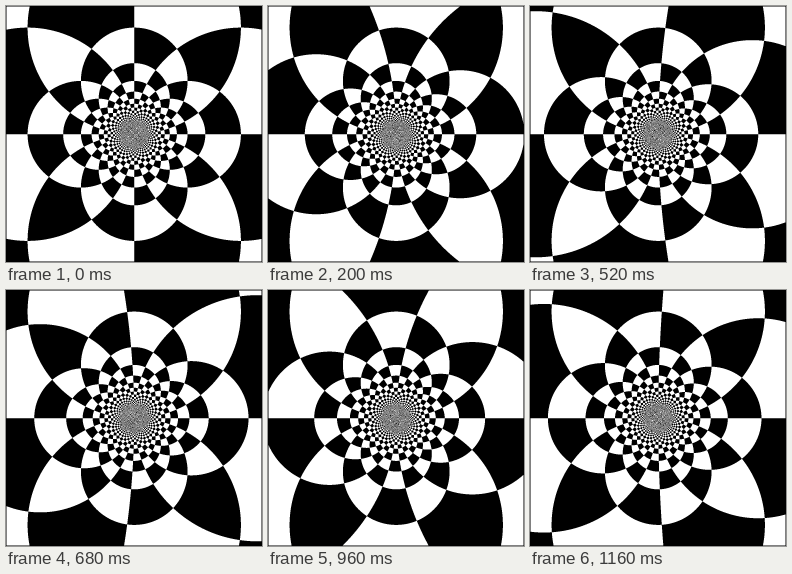
These frames come from a looping animation (256 px wide and 256 px high, 1.2 s). An HTML page with a canvas:

```html
<!DOCTYPE html>
<html lang="en">
<head>
<meta charset="utf-8">
<title>Inverted checkerboard</title>
<style>
  html, body { margin: 0; width: 100%; height: 100%; overflow: hidden; background: #000; }
  canvas { display: block; width: 100vw; height: 100vh; image-rendering: pixelated; }
</style>
</head>
<body>
<canvas id="stage" width="256" height="256"></canvas>
<script>
const SIZE = 256;
const LOOP = 1200;
const STEP = 40;
const STEPS = LOOP / STEP;
const SCALE = SIZE / 1.2; // inversion radius squared, in pixels per tile
const CENTER = SIZE / 2 + 0.25;
const SAMPLES = 4; // per pixel and axis
const BORDER = 0.5;

const ctx = document.getElementById('stage').getContext('2d');
const frames = [];

const inside = p => p > BORDER && p < SIZE - BORDER;

// A checkerboard seen through the inversion 1/z, sliding two tiles per loop.
function render(shift) {
  const fine = SIZE * SAMPLES;
  const light = new Uint8Array(SIZE * SIZE);
  for (let j = 0; j < fine; j++) {
    const py = (j + 0.5) / SAMPLES;
    if (!inside(py)) continue;
    const y = CENTER - py;
    const row = Math.floor(py) * SIZE;
    for (let i = 0; i < fine; i++) {
      const px = (i + 0.5) / SAMPLES;
      if (!inside(px)) continue;
      const x = px - CENTER;
      const k = SCALE / (x * x + y * y);
      const tile = Math.floor(x * k + shift) + Math.floor(y * k);
      light[row + Math.floor(px)] += tile & 1;
    }
  }

  const image = ctx.createImageData(SIZE, SIZE);
  const white = SAMPLES * SAMPLES;
  light.forEach((sum, n) => {
    const gray = 255 * sum / white;
    image.data.set([gray, gray, gray, 255], n * 4);
  });
  return image;
}

for (let n = 0; n < STEPS; n++) frames.push(render(2 * n / STEPS));

const start = performance.now();

function tick(now) {
  const time = Math.max(0, now - start) % LOOP;
  ctx.putImageData(frames[Math.floor(time / STEP)], 0, 0);
  requestAnimationFrame(tick);
}

tick(start);
</script>
</body>
</html>
```
